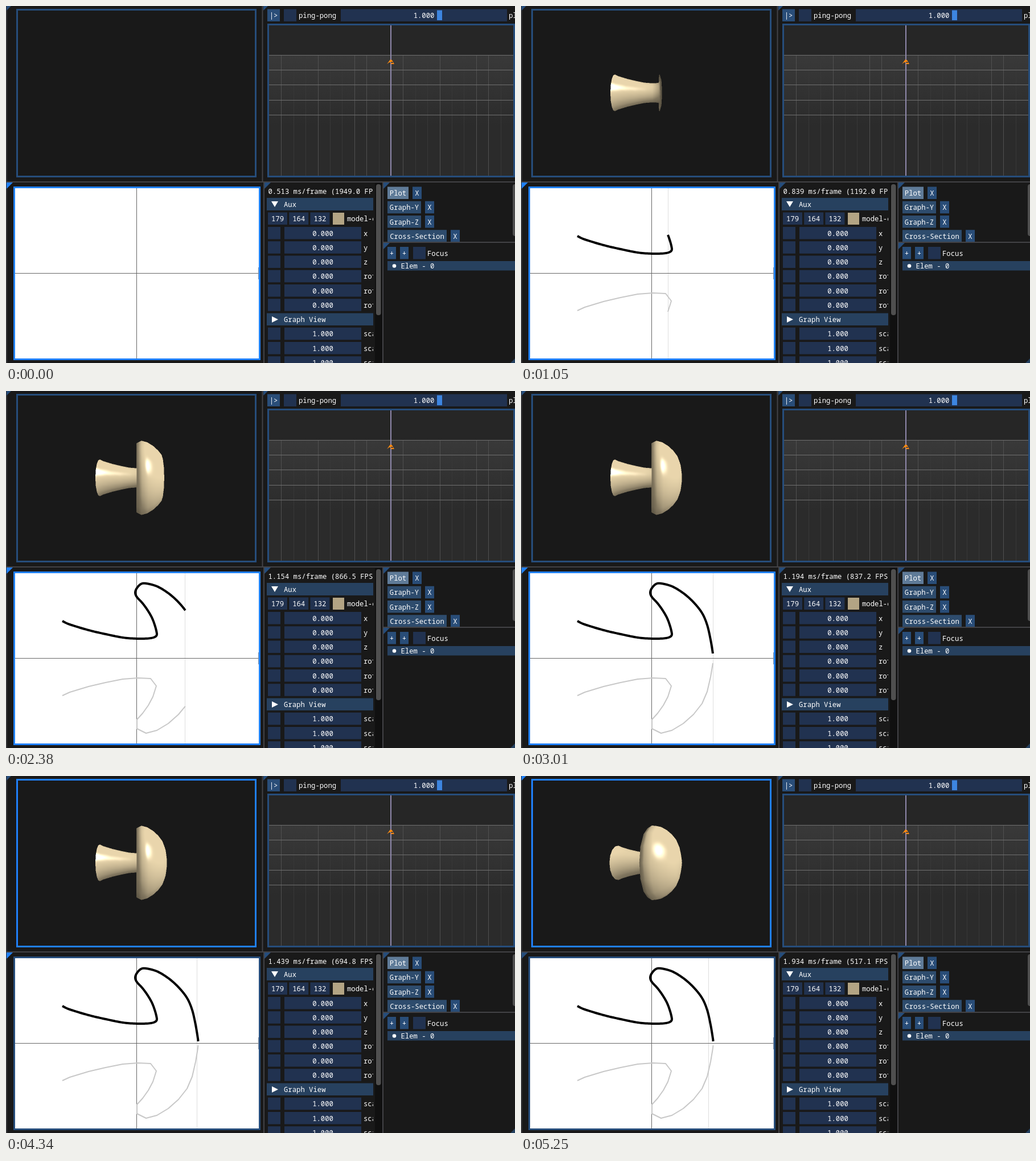
An HTML page with a canvas that plays this animation: 894x627 px, repeating every 5.32 s.

```html
<!DOCTYPE html>
<html lang="en">
<head>
<meta charset="utf-8">
<title>Lathe modeller</title>
<style>
html, body { margin: 0; width: 100%; height: 100%; overflow: hidden; background: #181818; }
canvas { display: block; }
</style>
</head>
<body>
<canvas id="stage" width="894" height="627"></canvas>
<script>
const LOOP = 5320, STEP = 70;
const ctx = document.getElementById('stage').getContext('2d');
const BG = '#191919', FIELD = '#213250', BUTTON = '#294d78', HEADER = '#27415f';
const DIM = '#264d7b', ACTIVE = '#2080fa', HOVER = '#4a97ee';

// Pen stroke: x, y, time
const stroke = [
  [99, 404, 100], [112, 410, 190], [145, 420, 330], [175, 427, 450], [205, 433, 570],
  [232, 435, 670], [254, 434, 760], [264, 430, 850], [264, 421, 900], [258, 402, 1050],
  [250, 387, 1170], [240, 373, 1290], [230, 362, 1400], [227, 354, 1480], [230, 346, 1580],
  [237, 339, 1660], [246, 338, 1730], [265, 343, 1820], [285, 355, 2020], [303, 371, 2220],
  [318, 390, 2430], [327, 411, 2600], [333, 437, 2740], [337, 461, 3010], [337.5, 466, 3400]
];
const softPoints = new Set([7, 13, 15]);
const AXIS = 469.5;

function track(keys, t) {
  if (t <= keys[0][0]) return keys[0][1];
  for (let i = 1; i < keys.length; i++) {
    const [a, p] = keys[i - 1], [b, q] = keys[i];
    if (t <= b) return p + (q - p) * (t - a) / (b - a);
  }
  return keys[keys.length - 1][1];
}

function penAt(t) {
  const last = stroke.length - 1;
  if (t >= stroke[last][2]) return stroke[last];
  let i = 0;
  while (stroke[i + 1][2] <= t) i++;
  const p = [i - 1, i, i + 1, i + 2].map(k => stroke[Math.max(0, Math.min(last, k))]);
  const u = (t - p[1][2]) / (p[2][2] - p[1][2]);
  return [0, 1].map(k => {
    const [a, b, c, d] = p.map(q => q[k]);
    return b + u / 2 * (c - a + u * (2 * a - 5 * b + 4 * c - d + u * (3 * (b - c) + d - a)));
  });
}

function coarseProfile(t) {
  const pts = stroke.filter((p, i) => p[2] < t && !softPoints.has(i));
  return t > stroke[0][2] ? [...pts, penAt(t)] : [];
}

// Drawing helpers
function rect(x0, y0, x1, y1, fill, r = 0) {
  ctx.fillStyle = fill;
  ctx.beginPath();
  ctx.roundRect(x0, y0, x1 - x0, y1 - y0, r);
  ctx.fill();
}
function poly(fill, ...pts) {
  ctx.fillStyle = fill;
  ctx.beginPath();
  pts.forEach(([x, y]) => ctx.lineTo(x, y));
  ctx.fill();
}
function line(pts, color, width = 1) {
  ctx.strokeStyle = color;
  ctx.lineWidth = width;
  ctx.beginPath();
  pts.forEach(([x, y]) => ctx.lineTo(x, y));
  ctx.stroke();
}
function frame(x0, y0, x1, y1, color, fill) {
  rect(x0, y0, x1, y1, color);
  rect(x0 + 3, y0 + 3, x1 - 3, y1 - 3, fill);
}
function text(s, x, y, align = 'left') {
  ctx.fillStyle = '#fff';
  ctx.textAlign = align;
  ctx.fillText(s, x, y);
}
function button(s, x0, x1, y, color = BUTTON) {
  rect(x0, y - 11, x1, y + 10.5, color);
  text(s, (x0 + x1) / 2, y + 4.5, 'center');
}
function corner(x, y, color) {
  poly(color, [x, y], [x + 11, y], [x, y + 11]);
}
function clipped(x, y, w, h, draw) {
  ctx.save();
  ctx.beginPath();
  ctx.rect(x, y, w, h);
  ctx.clip();
  draw();
  ctx.restore();
}

// Lathe model: software rasteriser with depth buffer
const SIZE = 140, SS = 2, N = SIZE * SS, LEFT = 150, TOP = 82;
const CX = 229, CY = 152.5, SCALE = 0.49, DIST = 285, SLICES = 16;
const LIGHT = [0.62, 0.52, 0.59], CLAY = [179, 164, 132];
const modelCanvas = document.createElement('canvas');
modelCanvas.width = modelCanvas.height = N;
const modelCtx = modelCanvas.getContext('2d');
const image = modelCtx.createImageData(N, N);
const depth = new Float32Array(N * N);

function shade(at, nx, ny, nz, px, py) {
  const len = Math.hypot(nx, ny, nz) || 1;
  nx /= len; ny /= len; nz /= len;
  const d = nx * LIGHT[0] + ny * LIGHT[1] + nz * LIGHT[2];
  const k = Math.min(1.3, 0.72 + (d > 0 ? 0.68 : 0.3) * d);
  const vx = (CX - LEFT - px / SS) / DIST, vy = (py / SS - CY + TOP) / DIST;
  const shine = (2 * d * nx - LIGHT[0]) * vx + (2 * d * ny - LIGHT[1]) * vy + 2 * d * nz - LIGHT[2];
  const spec = d > 0 && shine > 0 ? 110 * Math.min(1, shine) ** 24 : 0;
  for (let c = 0; c < 3; c++) image.data[at * 4 + c] = CLAY[c] * k + spec;
  image.data[at * 4 + 3] = 255;
}

function triangle(a, b, c) {
  const area = (b.x - a.x) * (c.y - a.y) - (c.x - a.x) * (b.y - a.y);
  if (Math.abs(area) < 1e-6) return;
  const lo = k => Math.max(0, Math.floor(Math.min(a[k], b[k], c[k])));
  const hi = k => Math.min(N - 1, Math.ceil(Math.max(a[k], b[k], c[k])));
  const x0 = lo('x'), x1 = hi('x'), y0 = lo('y'), y1 = hi('y');
  for (let y = y0; y <= y1; y++) {
    for (let x = x0; x <= x1; x++) {
      const px = x + 0.5, py = y + 0.5;
      const v = ((px - a.x) * (c.y - a.y) - (c.x - a.x) * (py - a.y)) / area;
      const w = ((b.x - a.x) * (py - a.y) - (px - a.x) * (b.y - a.y)) / area;
      const u = 1 - v - w;
      if (u < -1e-6 || v < -1e-6 || w < -1e-6) continue;
      const z = u * a.z + v * b.z + w * c.z, at = y * N + x;
      if (z <= depth[at]) continue;
      depth[at] = z;
      const mix = i => u * a.n[i] + v * b.n[i] + w * c.n[i];
      shade(at, mix(0), mix(1), mix(2), px, py);
    }
  }
}

function renderModel(points, yaw, pitch) {
  image.data.fill(0);
  depth.fill(-1e9);
  const prof = points.map(([x, y]) => [(x - 229.5) * SCALE, (AXIS - y) * SCALE]);
  const cy = Math.cos(yaw), sy = Math.sin(yaw), cp = Math.cos(pitch), sp = Math.sin(pitch);
  const turn = (x, y, z) => {
    const zz = x * sy + z * cy;
    return [x * cy - z * sy, y * cp - zz * sp, y * sp + zz * cp];
  };
  const unit = (p, q) => {
    const dx = q[0] - p[0], dy = q[1] - p[1], l = Math.hypot(dx, dy) || 1;
    return [dx / l, dy / l];
  };
  const rings = prof.map((p, i) => {
    const before = i ? unit(prof[i - 1], p) : [0, 0];
    const after = i < prof.length - 1 ? unit(p, prof[i + 1]) : [0, 0];
    const dx = before[0] + after[0], dr = before[1] + after[1], l = Math.hypot(dx, dr) || 1;
    return Array.from({ length: SLICES + 1 }, (_, k) => {
      const a = k / SLICES * Math.PI * 2, c = Math.cos(a), s = Math.sin(a);
      const [x, y, z] = turn(p[0], p[1] * c, p[1] * s);
      const f = DIST / (DIST - z);
      return {
        x: (CX - LEFT + x * f) * SS, y: (CY - TOP - y * f) * SS, z: f,
        n: turn(-dr / l, dx / l * c, dx / l * s)
      };
    });
  });
  for (let i = 1; i < rings.length; i++) {
    const p = rings[i - 1], q = rings[i];
    for (let k = 0; k < SLICES; k++) {
      triangle(p[k], q[k], q[k + 1]);
      triangle(p[k], q[k + 1], p[k + 1]);
    }
  }
  modelCtx.putImageData(image, 0, 0);
}

function drawPlot() {
  button('|>', 459, 481, 16.5);
  rect(488, 5.5, 510, 27, FIELD);
  text('ping-pong', 514, 21);
  rect(588, 5.5, 880, 27, FIELD);
  rect(757, 7.5, 766, 25, '#3d85e0');
  text('1.000', 734, 21, 'center');
  text('pl', 883, 21);

  frame(459, 31, 894, 301, DIM, '#2b2b2b');
  rect(462, 34, 891, 86, '#262626');
  const fade = ctx.createLinearGradient(0, 86, 0, 210);
  fade.addColorStop(0, '#393939');
  fade.addColorStop(1, '#2b2b2b');
  rect(462, 86, 891, 210, fade);
  const major = new Set([-9, -6, -3, -2, 1, 4, 7, 8]);
  for (let i = -9; i <= 9; i++) {
    const x = Math.floor(676.5 + i * 21.4) + 0.5;
    line([[x, 86], [x, 298]], major.has(i) ? '#505050' : '#383838');
  }
  for (let i = 0; i < 5; i++) {
    const y = Math.floor(86 + i * 26.4) + 0.5;
    line([[462, y], [891, y]], '#707070');
  }
  line([[676, 34], [676, 298]], '#8f88ab', 2);
  poly('#ff8a12', [669, 102], [675, 94], [678, 95], [682, 102], [675, 102], [678, 99], [673, 99]);
  poly('#40382f', [676, 98], [679, 98], [680, 100], [677, 100]);
}

function drawAux(fps) {
  rect(648, 311, 661, 627, '#101010');
  rect(650, 313, 658.5, 543, '#4f4f4f', 4);
  clipped(455, 311, 190, 316, () => {
    text(`${(1000 / fps).toFixed(3)} ms/frame (${fps.toFixed(1)} FPS)`, 460.5, 330);
    rect(458, 337, 645, 359, HEADER);
    poly('#fff', [466, 343], [478, 343], [472, 353]);
    text('Aux', 488, 352.5);
    ['179', '164', '132'].forEach((s, i) => button(s, 460 + i * 37.2, 494 + i * 37.2, 373.5, FIELD));
    rect(574, 363, 594, 384, '#b3a484');
    text('model-color', 599, 378);
    const labels = ['x', 'y', 'z', 'rot-x', 'rot-y', 'rot-z', '', 'scale-x', 'scale-y', 'scale-z'];
    labels.forEach((s, i) => {
      const y = 399 + i * 25.25;
      if (!s) {
        rect(458, y - 11, 645, y + 10.5, HEADER);
        poly('#fff', [467, y - 5.5], [478, y], [467, y + 5.5]);
        text('Graph View', 488, y + 4.5);
        return;
      }
      rect(460, y - 11, 482, y + 10.5, FIELD);
      button(i < 6 ? '0.000' : '1.000', 489, 624, y, FIELD);
      text(s, 628, y + 4.5);
    });
  });
}

function drawLists() {
  clipped(664, 311, 230, 103, () => {
    [['Plot', 707], ['Graph-Y', 729], ['Graph-Z', 729], ['Cross-Section', 774]].forEach(([s, x], i) => {
      const y = 328.5 + i * 25.25;
      button(s, 670, x, y, i ? '#2e4c6d' : '#5f7b98');
      button('X', x + 7, x + 23, y);
    });
    rect(890, 313, 898, 404, '#4f4f4f', 4);
  });
  button('+', 670, 685, 434);
  button('+', 692, 707, 434);
  rect(715, 423, 737, 444.5, FIELD);
  text('Focus', 740, 438.5);
  rect(670, 448, 894, 464.5, HEADER);
  ctx.fillStyle = '#fff';
  ctx.beginPath();
  ctx.arc(682, 456.5, 3.3, 0, 7);
  ctx.fill();
  text('Elem - 0', 693.5, 461);
  poly('#24405f', [894, 619], [894, 627], [886, 627]);
}

function drawSketch(t, profile) {
  const border = t < 3850 ? ACTIVE : t < 4130 ? HOVER : DIM;
  frame(13, 317, 447, 622, border, '#fff');
  const hovering = t >= 70 && t < 1500 || t >= 2000 && t < 3500 || t >= 4130;
  if (hovering) {
    const x = t < 3600 ? penAt(Math.max(t, 100))[0] : track([[4130, 337], [4760, 331], [5250, 329]], t);
    const snapped = Math.floor(x) + 0.5;
    line([[snapped, 320], [snapped, 619]], '#dedede');
  }
  line([[229.5, 320], [229.5, 619]], '#666');
  line([[16, 469.5], [444, 469.5]], '#666');
  line([[443.5, 459], [443.5, 480]], '#8a96a8');
  if (!profile.length) return;
  line(profile.map(([x, y]) => [x, 2 * AXIS - y]), '#c8c8c8', 2);
  const ink = [], end = Math.min(t, 3400);
  for (let s = 100; s < end; s += 10) ink.push(penAt(s));
  ink.push(penAt(end));
  ctx.lineJoin = 'round';
  line(ink, '#000', 4);
}

function draw(t) {
  ctx.font = '12.25px "Noto Sans Mono", "DejaVu Sans Mono", monospace';
  rect(0, 0, 894, 627, BG);
  const seam = '#424246';
  line([[1, 0], [1, 627]], seam, 1.5);
  line([[450.5, 0], [450.5, 308]], seam, 2);
  line([[0, 309], [894, 309]], seam, 2);
  line([[453, 310], [453, 627]], seam, 2);
  line([[662, 310], [662, 627]], seam, 2);
  line([[662, 415], [894, 415]], seam, 2);

  const viewFocus = t >= 4410;
  corner(1, -3, viewFocus ? ACTIVE : DIM);
  corner(452, -3, DIM);
  corner(1, 310, viewFocus ? DIM : ACTIVE);
  corner(454, 310, DIM);
  corner(663, 310, DIM);
  corner(663, 416, DIM);

  const profile = coarseProfile(t);
  frame(18, 5, 440, 301, t >= 4200 ? ACTIVE : DIM, BG);
  if (profile.length > 1) {
    const deg = Math.PI / 180;
    const yaw = track([[4410, 0], [4760, 14], [5250, 16.5]], t);
    const pitch = track([[4410, 0], [4760, 6], [5250, 0]], t);
    renderModel(profile, yaw * deg, pitch * deg);
    ctx.drawImage(modelCanvas, LEFT, TOP, SIZE, SIZE);
  }
  drawPlot();
  drawSketch(t, profile);
  drawAux(track([[0, 1949], [1050, 1192], [1820, 892.5], [3010, 837.2], [3850, 871.7], [4760, 543.2], [5250, 517.1]], t));
  drawLists();
}

let shown = -1;
function tick() {
  const t = Math.floor(performance.now() % LOOP / STEP) * STEP;
  if (t !== shown) draw(shown = t);
  requestAnimationFrame(tick);
}
tick();
</script>
</body>
</html>
```
